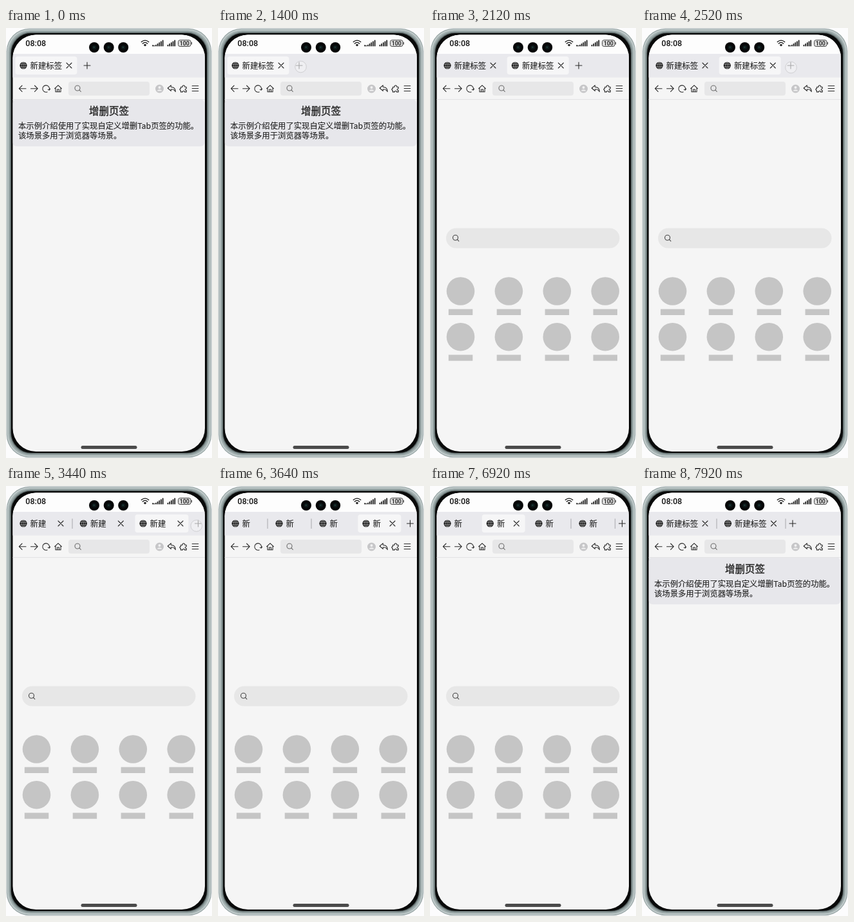
Write an HTML page that moves like this. It is 320 by 665 pixels and loops after 8000 ms.

```html
<!DOCTYPE html>
<html lang="zh">
<head>
<meta charset="utf-8">
<title>增删页签</title>
<style>
html, body { margin: 0; width: 100%; height: 100%; overflow: hidden; background: #fcfcfd; }
svg { display: block; width: 320px; height: 665px; }
text { font-family: "Noto Sans CJK SC", "Noto Sans CJK", "Noto Sans", sans-serif; fill: #222; stroke: #222; stroke-width: .12; }
.num { font-family: Roboto, sans-serif; font-weight: 500; fill: #151515; stroke: none; }
.line { fill: none; stroke: #2b2b2b; stroke-width: 1.1; stroke-linecap: round; stroke-linejoin: round; }
</style>
</head>
<body>
<svg viewBox="0 0 320 665" xmlns="http://www.w3.org/2000/svg">
  <defs>
    <clipPath id="screen"><rect x="10.5" y="10.5" width="298.5" height="644.5" rx="36"/></clipPath>
    <g id="globe">
      <circle r="5.6" fill="#141414"/>
      <path d="M0 -5.4V5.4M-5.2 -1.9H5.2M-5.2 1.9H5.2" stroke="#e4e4e4" stroke-width=".5"/>
      <ellipse rx="2.8" ry="5.4" fill="none" stroke="#e4e4e4" stroke-width=".5"/>
    </g>
    <g id="lens" class="line"><circle r="4"/><path d="M2.9 2.9L5.3 5.3"/></g>
    <g id="camera">
      <circle r="8" fill="#050607"/>
      <circle r="3.6" fill="#0d1718"/>
      <circle cx="-.3" cy="-.3" r="1.3" fill="#1d3a36"/>
    </g>
  </defs>

  <g id="body"></g>

  <g clip-path="url(#screen)">
    <rect x="8" y="8" width="304" height="650" fill="#f5f5f5"/>
    <rect x="8" y="8" width="304" height="32" fill="#fdfdfd"/>
    <rect x="8" y="40" width="304" height="36.5" fill="#e9e9ed"/>

    <!-- intro page -->
    <g id="intro">
      <rect x="10.5" y="110.5" width="298" height="72.5" rx="6" fill="#e7e7eb"/>
      <text x="160" y="134.3" font-size="15.5" font-weight="500" text-anchor="middle" style="stroke-width:.35">增删页签</text>
      <text x="19" y="156.3" font-size="12.35">本示例介绍使用了实现自定义增删Tab页签的功能。</text>
      <text x="19" y="171" font-size="12.35">该场景多用于浏览器等场景。</text>
    </g>

    <!-- new tab page -->
    <g id="blank">
      <rect x="25" y="309.5" width="269.5" height="31" rx="15.5" fill="#e7e7e7"/>
      <use href="#lens" x="39.5" y="324.3" opacity=".85"/>
      <g id="tiles" fill="#c5c5c5"></g>
    </g>
    <path d="M10 110.5H310" stroke="#e2e2e4"/>

    <!-- toolbar -->
    <rect x="97" y="83" width="126" height="21.5" rx="4" fill="#e7e7e8"/>
    <use href="#lens" x="111" y="93" opacity=".65"/>
    <g class="line">
      <path d="M31 93.7H20.5M25 89L20.3 93.7L25 98.4"/>
      <path d="M38.5 93.7H49M44.5 89L49.2 93.7L44.5 98.4"/>
      <path d="M64 98.9A5.3 5.3 0 1 1 67.3 95.2M65.2 95.3L67.4 96L68.6 94"/>
      <path d="M75.6 93.6L81 88.6L86.4 93.6M77 92.6V98.8H85V92.6M79.6 98.6V95H82.4V98.6"/>
      <path d="M256.3 88.6L251.2 93L256.3 97.3V94.8C260 94.6 262 96 263.2 98.6C263.4 94 260.6 91.4 256.3 91.2Z"/>
      <path d="M271.6 91.2H274.2C273.4 88 278.4 88 277.8 91.2H280.2V93.7C277.6 93.4 277.6 96.8 280.2 96.4V98.9H277.3C277.4 96.7 274.3 96.7 274.4 98.9H271.4V96.4C269.4 96.6 269.4 93.3 271.6 93.7Z"/>
      <path d="M289.2 89.5H298.8M289.2 93.5H298.8M289.2 97.5H298.8"/>
    </g>
    <circle cx="238.5" cy="94" r="6.5" fill="#c6c6c8"/>
    <circle cx="238.5" cy="92" r="2" fill="#f1f1f1"/>
    <path d="M234.7 97.6A3.9 3 0 0 1 242.3 97.6Z" fill="#f1f1f1"/>

    <!-- tab strip -->
    <rect id="active" y="44" height="28" rx="4" fill="#f6f6f7"/>
    <g id="tabs"></g>
    <path id="plus" class="line" d="M-5 0H5M0 -5V5"/>
    <circle id="ring" r="8.8" fill="#fff" fill-opacity=".25" stroke="#cfcfd2" stroke-width="1"/>

    <!-- status bar -->
    <text class="num" x="30.3" y="28.2" font-size="12.6">08:08</text>
    <path class="line" d="M210.3 21.6Q216 16.6 221.7 21.6M212.3 24.1Q216 20.7 219.7 24.1" style="stroke:#151515;stroke-width:1.3"/>
    <path d="M213.7 26Q216 24 218.3 26L216 28.6Z" fill="#151515"/>
    <g id="bars" fill="#151515"></g>
    <rect x="267.5" y="18.7" width="19.5" height="9.8" rx="2.8" fill="#dedede" stroke="#444" stroke-width="1"/>
    <path d="M288.4 21.8V25.4" stroke="#444" stroke-width="1.2"/>
    <text class="num" x="277.2" y="26.9" font-size="8.8" text-anchor="middle">100</text>
    <rect x="116.5" y="646" width="87" height="5" rx="2.5" fill="#4b4b4b"/>
  </g>
  <use href="#camera" x="137" y="30"/>
  <use href="#camera" x="159.7" y="30"/>
  <use href="#camera" x="182.2" y="30"/>
</svg>
<script>
const LOOP = 8000;
const LABEL = "新建标签";
const $ = id => document.getElementById(id);

// phone shell, nested from the rim inwards: inset, colour
const shell = [
  [0.8, "#93a1a1"], [1.8, "#c3cdcd"], [3.4, "#a3b0b0"],
  [5.2, "#8a9898"], [6.8, "#596363"], [8, "#080909"]
];

// chars: visible label length, close: offset of the close mark, sel: active tab
const full = { chars: 4, close: 71, width: 96 };
const mid = { chars: 2, close: 58, width: 83 };
const small = { chars: 1, close: 41, width: 67, onlyActive: true };
const states = [
  { at: 0, ...full, x: [27], sel: 0, seps: [], plus: 126, intro: true },
  { at: 1520, ...full, x: [27, 132.3], sel: 1, seps: [], plus: 231 },
  { at: 2600, ...mid, x: [27, 120.3, 213], sel: 2, seps: [103], plus: 298.5 },
  { at: 3560, ...small, x: [27, 95, 163, 230], sel: 3, seps: [77, 145], plus: 298.5 },
  { at: 5280, ...small, x: [27, 95, 161.3, 237], sel: 2, seps: [77, 287.5], plus: 298.5 },
  { at: 6200, ...small, x: [27, 93.3, 169, 237], sel: 1, seps: [219, 287.5], plus: 298.5 },
  { at: 7000, ...mid, x: [27, 119.6, 212.2], sel: -1, seps: [102.5, 195, 287.5], plus: 298.5, intro: true },
  { at: 7920, ...full, x: [27, 133.5], sel: -1, seps: [116, 223], plus: 234, intro: true }
];

// from, to, x, y, on the plus
const taps = [
  [1400, 1520, 128.5, 60, true],
  [2520, 2600, 231.5, 61, true],
  [3440, 3560, 295.8, 61.5, true],
  [5200, 5280, 185, 66],
  [6080, 6120, 109, 61],
  [6880, 6920, 134, 60]
];

function tabMarkup(s) {
  const tabs = s.x.map((x, i) => {
    const close = s.onlyActive && i !== s.sel ? "" :
      `<path class="line" transform="translate(${x + s.close} 58)" d="M-4 -4L4 4M4 -4L-4 4"/>`;
    return `<use href="#globe" x="${x}" y="58"/>` +
      `<text x="${x + 10.6}" y="62.5" font-size="12.4">${LABEL.slice(0, s.chars)}</text>${close}`;
  });
  const seps = s.seps.map(x => `<path d="M${x} 50.5V66" stroke="#b9b9be" stroke-width="1.4"/>`);
  return tabs.concat(seps).join("");
}

function buildStatic() {
  let tiles = "", bars = "";
  for (let i = 0; i < 8; i++) {
    const x = 47.5 + 74.9 * (i % 4), y = 407 + 70.7 * Math.floor(i / 4);
    tiles += `<circle cx="${x}" cy="${y}" r="21.8"/>` +
      `<rect x="${x - 18.7}" y="${y + 27.7}" width="37.5" height="9.3"/>`;
  }
  const bar = (x, h) => `<rect x="${x}" y="${28.3 - h}" width="1.7" height="${h}"/>`;
  for (let i = 0; i < 5; i++) {
    const h = 2.4 + i * 1.8;
    bars += bar(232 + i * 2.7, h) + bar(250.6 + i * 2.7, h);
  }
  bars += bar(227.2, 2) + bar(229.4, 1.6);
  $("tiles").innerHTML = tiles;
  $("bars").innerHTML = bars;
  $("body").innerHTML = shell.map(([d, fill]) =>
    `<rect x="${d}" y="${d}" width="${320 - 2 * d}" height="${665 - 2 * d}" rx="${36 - d * 0.6}" fill="${fill}"/>`
  ).join("");
}

let shown = null;
function showState(s) {
  if (s === shown) return;
  shown = s;
  $("tabs").innerHTML = tabMarkup(s);
  $("intro").style.display = s.intro ? "" : "none";
  $("blank").style.display = s.intro ? "none" : "";
  $("plus").setAttribute("transform", `translate(${s.plus} 58)`);
  const active = $("active");
  active.style.display = s.sel < 0 ? "none" : "";
  if (s.sel >= 0) {
    active.setAttribute("x", s.x[s.sel] - 12.6);
    active.setAttribute("width", s.width);
  }
}

function render(t) {
  showState(states.filter(s => s.at <= t).pop());
  const tap = taps.find(p => t >= p[0] && t < p[1]);
  const ring = $("ring");
  ring.style.display = tap ? "" : "none";
  $("plus").style.opacity = tap && tap[4] ? 0.5 : 1;
  if (tap) {
    ring.setAttribute("cx", tap[2]);
    ring.setAttribute("cy", tap[3]);
  }
}

buildStatic();
const start = performance.now();
function tick() {
  render((performance.now() - start) % LOOP);
  requestAnimationFrame(tick);
}
render(0);
requestAnimationFrame(tick);
</script>
</body>
</html>
```
